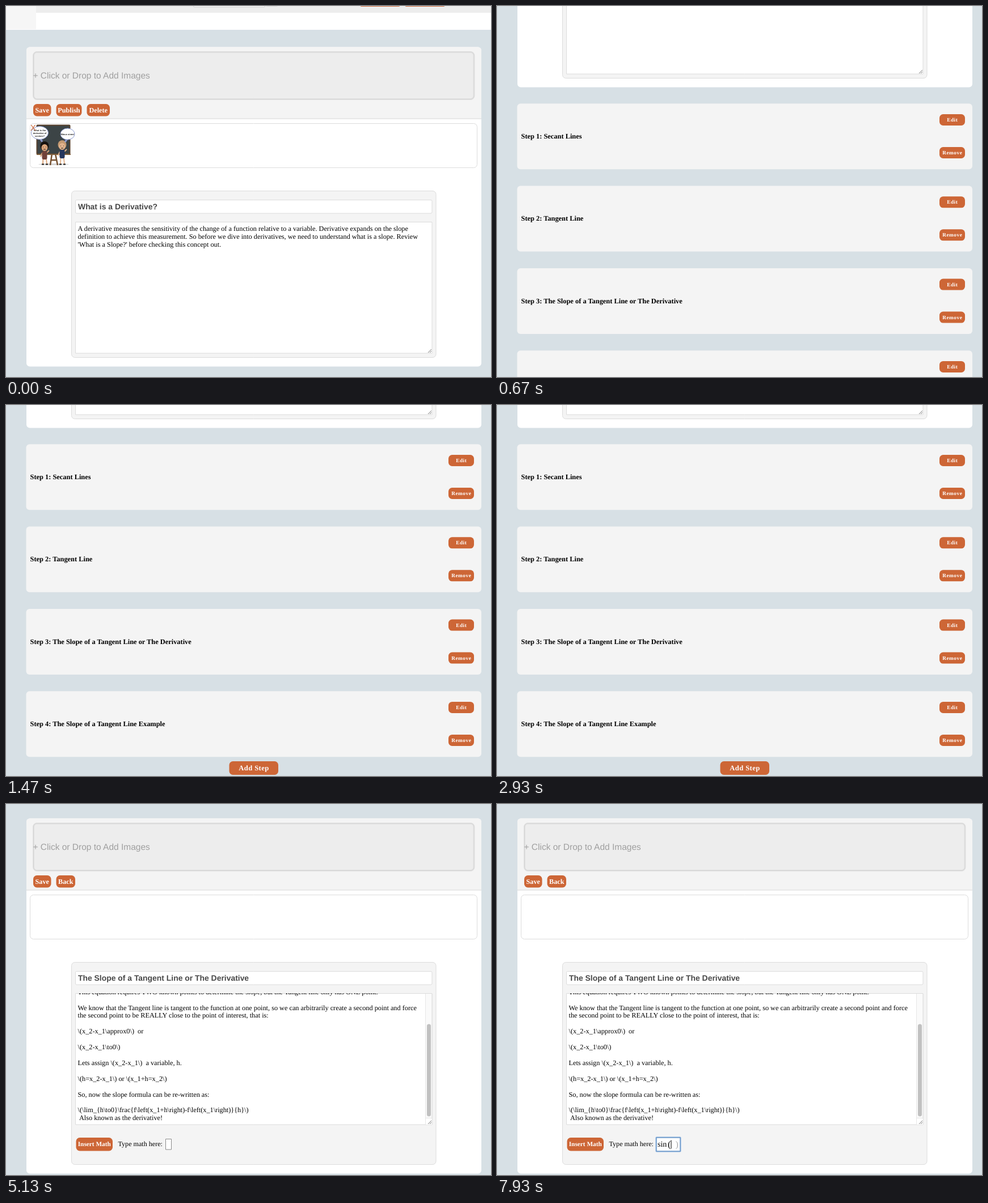
An HTML page with a canvas that plays this animation: 855 by 655 pixels, repeating every 8000 ms.

```html
<!DOCTYPE html>
<html lang="en">
<head>
<meta charset="utf-8">
<title>Lesson editor</title>
<style>
html, body { margin: 0; width: 100%; height: 100%; overflow: hidden; background: #d7e0e5; }
canvas { display: block; }
</style>
</head>
<body>
<canvas id="stage" width="855" height="655"></canvas>
<script>
const ctx = document.getElementById('stage').getContext('2d');
const SERIF = '"Liberation Serif", Times, serif';
const SANS = '"Liberation Sans", Arial, sans-serif';
const LOOP = 8000, TICK = 1000 / 15, LINE = 13.92;
const BG = '#d7e0e5', PANEL = '#f4f4f4', EDGE = '#dcdcdc', ORANGE = '#cd6636';

const EDIT_AT = 3200, FOCUS_AT = 5750;
const KEYS = [[7200, 's'], [7330, 'si'], [7400, 'sin'], [7670, 'sin(']];

const STEPS = ['Secant Lines', 'Tangent Line',
  'The Slope of a Tangent Line or The Derivative', 'The Slope of a Tangent Line Example'];

const INTRO = `A derivative measures the sensitivity of the change of a function relative to a variable. Derivative expands on the slope
definition to achieve this measurement. So before we dive into derivatives, we need to understand what is a slope. Review
'What is a Slope?' before checking this concept out.`;

const LESSON = String.raw`Recall that the line slope equation is defined as:

\(\frac{f\left(x_2\right)-f\left(x_1\right)}{x_2-x_1}\)

This equation requires TWO known points to determine the slope, but the Tangent line only has ONE point.

We know that the Tangent line is tangent to the function at one point, so we can arbitrarily create a second point and force
the second point to be REALLY close to the point of interest, that is:

\(x_2-x_1\approx0\)  or

\(x_2-x_1\to0\)

Lets assign \(x_2-x_1\)  a variable, h.

\(h=x_2-x_1\) or \(x_1+h=x_2\)

So, now the slope formula can be re-written as:

\(\lim_{h\to0}\frac{f\left(x_1+h\right)-f\left(x_1\right)}{h}\)
 Also known as the derivative!`;

function ease(t, start, end) {
  const p = Math.min(1, Math.max(0, (t - start) / (end - start)));
  return p * p * (3 - 2 * p);
}

function rect(x, y, w, h, color) {
  ctx.fillStyle = color;
  ctx.fillRect(x, y, w, h);
}

function box(x, y, w, h, r, fill, stroke, width = 1) {
  ctx.beginPath();
  ctx.roundRect(x, y, w, h, r);
  if (fill) { ctx.fillStyle = fill; ctx.fill(); }
  if (stroke) { ctx.strokeStyle = stroke; ctx.lineWidth = width; ctx.stroke(); }
}

function oval(x, y, rx, ry, fill, stroke) {
  ctx.beginPath();
  ctx.ellipse(x, y, rx, ry, 0, 0, 7);
  ctx.fillStyle = fill;
  ctx.fill();
  if (stroke) { ctx.strokeStyle = stroke; ctx.lineWidth = 1; ctx.stroke(); }
}

function lines(color, width, ...segments) {
  ctx.strokeStyle = color;
  ctx.lineWidth = width;
  ctx.beginPath();
  for (const [x1, y1, x2, y2] of segments) { ctx.moveTo(x1, y1); ctx.lineTo(x2, y2); }
  ctx.stroke();
}

function text(str, x, y, font, color = '#000', align = 'left', spacing = 0) {
  ctx.font = font;
  ctx.fillStyle = color;
  ctx.textAlign = align;
  ctx.letterSpacing = spacing + 'px';
  ctx.fillText(str, x, y);
}

function button(label, x, y, w, h, size, spacing = 0) {
  box(x, y, w, h, 6.5, ORANGE);
  text(label, x + (w + spacing) / 2, y + h / 2 + size * 0.33, `bold ${size}px ${SERIF}`, '#fff', 'center', spacing);
}

function paragraph(str, x, y) {
  str.split('\n').forEach((line, i) => text(line, x, y + i * LINE, `12.27px ${SERIF}`));
}

function grip(x, y) {
  lines('#777', 1, [x - 6, y, x, y - 6], [x - 3, y, x, y - 3]);
}

function header() {
  rect(0, 0, 855, 42, '#fff');
  rect(0, 0, 855, 12, '#ededed');
  box(330.5, -10, 126, 12, 2, '#f8f8f8', '#cfcfcf');
  box(457, -10, 23, 11, 4, '#dadada');
  box(624, -10, 71, 11, 3, ORANGE);
  box(703, -10, 71, 11, 3, ORANGE);
  rect(0, -12, 53, 53, '#f6f6f6');
}

function kid(x, headY, hair, skin, shirt) {
  const waist = headY + 18;
  lines(skin, 2, [x - 2.5, waist, x - 3, 279], [x + 2.5, waist, x + 4, 279]);
  lines('#222', 2, [x - 5, 279.5, x - 1, 279.5], [x + 2, 279.5, x + 6, 279.5]);
  lines(skin, 2, [x - 4, headY + 10, x - 7, headY + 17], [x + 4, headY + 10, x + 8, headY + 6]);
  box(x - 4.5, headY + 7, 9, 15, 3, shirt);
  oval(x, headY - 2, 7.5, 8, hair);
  oval(x, headY + 1, 5.5, 6, skin);
  lines('#222', 1, [x - 3, headY, x - 2, headY], [x + 2, headY, x + 3, headY], [x - 2, headY + 4, x + 2, headY + 4]);
}

function bubble(x, y, rx, ry, words, tailX) {
  lines('#8d9bd0', 3, [x, y + ry - 2, tailX, y + ry + 4]);
  oval(x, y, rx, ry, '#fff', '#8d9bd0');
  words.forEach((word, i) =>
    text(word, x, y + 1.5 + (i - (words.length - 1) / 2) * 5, `bold 4px ${SANS}`, '#222', 'center'));
}

function cartoon() {
  oval(84, 279.5, 27, 1.5, '#d5d5d5');
  lines('#76502f', 2.5, [81, 261, 78, 281], [87, 261, 91, 281], [79, 272, 90, 272]);
  box(54.5, 210.5, 58, 51, 1, '#3c4446', '#59412d', 2);
  rect(54, 261, 60, 2, '#80603d');
  kid(68, 249, '#16120f', '#dca67c', '#71423a');
  kid(99, 247, '#c59a72', '#e3b48e', '#26365d');
  bubble(59.5, 224, 15, 11.5, ['What is the', 'derivative of', 'cosines?'], 64);
  bubble(108.5, 226, 12.5, 10, ['Minus sines!'], 104);
  text('X', 43, 219.5, `14.5px ${SANS}`, ORANGE);
}

// Card shared by both screens; the caller adds buttons and text.
function editorCard(cardHeight, panelHeight, title) {
  box(36, 72.5, 802, cardHeight, 6, '#fff');
  box(36, 72.5, 802, 127, [6, 6, 0, 0], PANEL);
  rect(36, 198.5, 802, 1, EDGE);
  box(48.5, 81.5, 776.5, 83, 6, '#ededed', '#e2e2e2', 3);
  box(48.5, 81, 776.5, 83.5, 6, null, '#d5d5d5');
  text('+ Click or Drop to Add Images', 47.5, 127.5, `15.5px ${SANS}`, '#a0a0a0');
  button('Save', 48, 173, 31.5, 21.5, 12.2);
  box(42.5, 207.5, 788, 78, 6, '#fff', EDGE);
  box(115.5, 326.5, 642.5, panelHeight, 6, PANEL, EDGE);
  box(122.5, 342.5, 628.5, 23.5, 2, '#fff', EDGE);
  text(title, 127, 359.3, `bold 13.92px ${SANS}`, '#484848');
  box(122.5, 381.5, 628.5, 231.5, 0, '#fff', EDGE);
}

function lessonScreen(t) {
  const scroll = 493 * ease(t, 439, 666) + 103 * ease(t, 1210, 1450);
  ctx.translate(0, -Math.round(scroll));
  header();
  editorCard(564, 294, 'What is a Derivative?');
  button('Publish', 88.5, 173, 45, 21.5, 12.2);
  button('Delete', 142.5, 173, 40.5, 21.5, 12.2);
  cartoon();
  paragraph(INTRO, 126.5, 397.3);
  grip(750, 612);
  STEPS.forEach((name, i) => {
    const y = 665.3 + i * 145.3;
    box(35.5, y, 802.5, 116, 6, PANEL);
    text(`Step ${i + 1}: ${name}`, 42.5, y + 61.7, `bold 12.4px ${SERIF}`);
    button('Edit', 780, y + 18.7, 45, 20, 9.3, 0.5);
    button('Remove', 780, y + 76.7, 45, 20, 9.3, 0.5);
  });
  button('Add Step', 393.5, 1225, 86.5, 24, 12.6, 0.4);
}

function mathField(t) {
  if (t < FOCUS_AT) {
    box(281.5, 591.5, 10, 18.5, 0, '#fff', '#8a8a8a');
    return;
  }
  const [lastKey, typed] = KEYS.filter(([at]) => t >= at).pop() || [FOCUS_AT, ''];
  const open = typed.endsWith('(');
  const style = typed.length < 3 ? 'italic ' : '';
  const font = `${style}14px ${SERIF}`;
  const word = typed.replace('(', '');
  ctx.font = font;
  ctx.letterSpacing = '0px';
  const end = 283 + ctx.measureText(word).width;
  const right = open ? 323 : Math.max(292, end + 4);
  const top = open ? 589 : 590.5, bottom = open ? 613 : 611.5;
  box(281, top, right - 281, bottom - top, 1, '#fff', '#a9c6e8', 3.5);
  box(281, top, right - 281, bottom - top, 0, '#fff', '#6a96c8', 1.5);
  text(word, 283, 605, font);
  if (open) {
    text('(', 301, 605.5, `16px ${SERIF}`);
    text(')', 314.5, 605.5, `16px ${SERIF}`, '#aaa');
  }
  if (Math.floor((t - lastKey) / 500) % 2 === 0) {
    rect(open ? 306.5 : end + 1, 593.5, 1, 15, '#000');
  }
}

function stepScreen(t) {
  const scrolled = ease(t, 4000, 4400);
  ctx.save();
  ctx.translate(0, -47);
  editorCard(627, 357, STEPS[2]);
  button('Back', 88.5, 173, 33.5, 21.5, 12.2);
  ctx.restore();

  ctx.save();
  ctx.beginPath();
  ctx.rect(123, 334, 616, 231.5);
  ctx.clip();
  paragraph(LESSON, 126.5, 350 - Math.round(70 * scrolled));
  ctx.restore();

  rect(739, 335, 12, 231, '#fafafa');
  rect(739, 335, 1, 231, '#e6e6e6');
  rect(750.5, 335, 1, 231, EDGE);
  box(742, 337.5 + 51 * scrolled, 7, 163, 3.5, '#c1c1c1');
  rect(739, 554, 12, 1, '#e6e6e6');
  rect(740, 555, 10.5, 11, '#fff');
  grip(750, 565);

  button('Insert Math', 123.5, 589, 64.5, 23.5, 11.3);
  text('Type math here:', 197.5, 604.3, `12.1px ${SERIF}`);
  mathField(t);
}

function draw(now) {
  const t = Math.floor((now % LOOP + 2) / TICK) * TICK;
  ctx.setTransform(1, 0, 0, 1, 0, 0);
  ctx.textRendering = 'geometricPrecision';
  rect(0, 0, 855, 655, BG);
  (t < EDIT_AT ? lessonScreen : stepScreen)(t);
}

const start = performance.now();
function frame(now) {
  draw(Math.max(0, now - start));
  requestAnimationFrame(frame);
}
requestAnimationFrame(frame);
</script>
</body>
</html>
```
